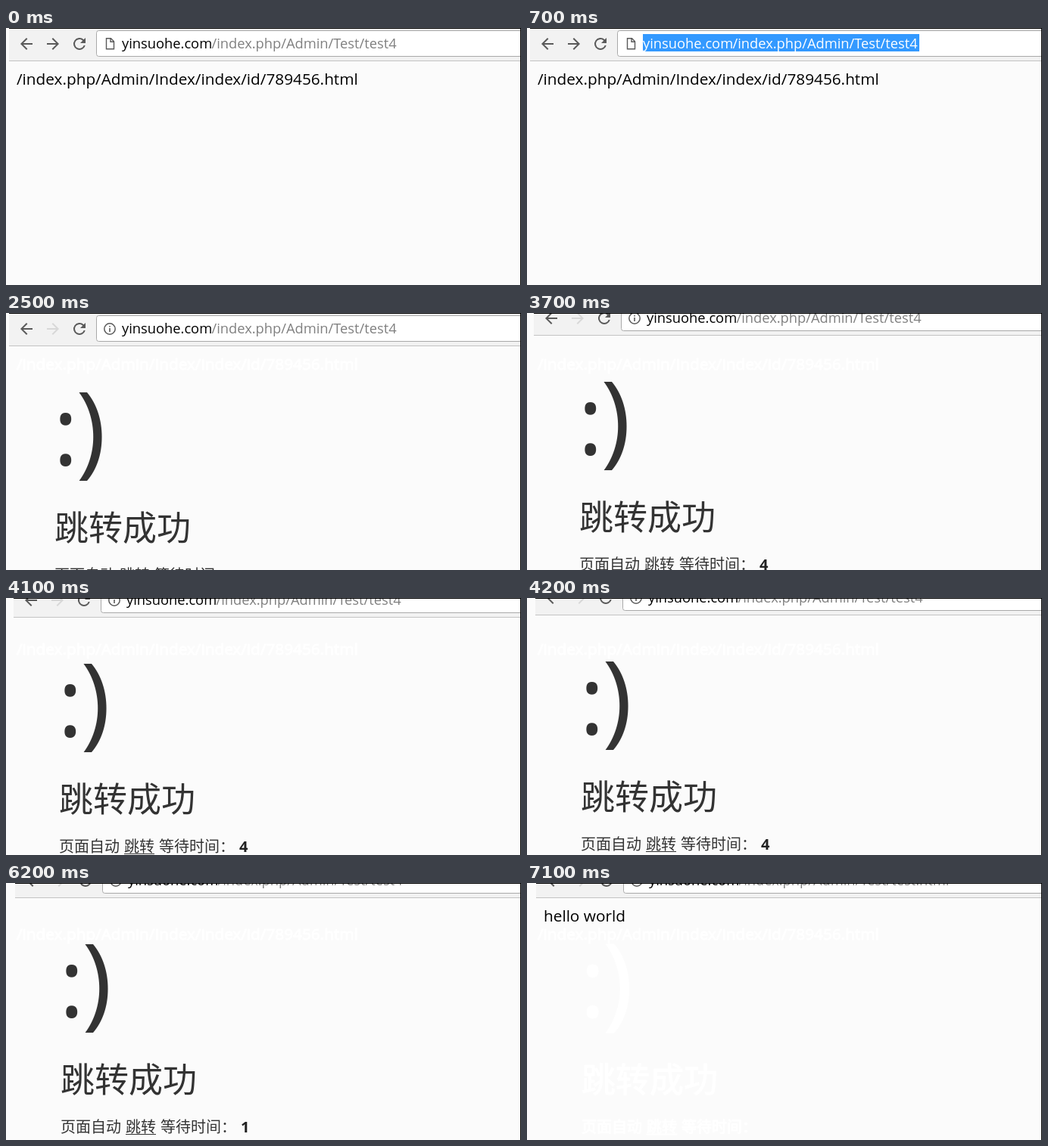
Recreate the animation shown at these times as an HTML page. Size 680 by 340 pixels, loop 8000 ms.

```html
<!DOCTYPE html>
<html lang="zh-CN">
<head>
<meta charset="utf-8">
<title>Page redirect</title>
<style>
  html, body { margin: 0; width: 100%; height: 100%; overflow: hidden; background: #fbfbfb; }
  svg { display: block; width: 100vw; height: 100vh; }
  text { font-family: "Open Sans", "Noto Sans", "Noto Sans CJK SC", "Noto Sans CJK", sans-serif; white-space: pre; }
  .url { font-size: 18.3px; }
  .body { font-size: 20.75px; }
  .colon { font-size: 126px; }
  .paren { font-size: 133px; }
  .title { font-size: 45px; }
  .wait { font-size: 20px; }
  .title, .wait { font-family: "Noto Sans CJK SC", "Noto Sans CJK", sans-serif; font-weight: 350; }
  .residue { fill: #fff; stroke: #fff; stroke-width: 1; }
  #count { font: bold 20px "Open Sans", "Noto Sans", sans-serif; }
</style>
</head>
<body>
<svg viewBox="0 0 680 340">
  <defs>
    <path id="arrow" d="M20 11H7.83l5.59-5.59L12 4l-8 8 8 8 1.41-1.41L7.83 13H20z"/>
    <g id="notice">
      <text class="colon" x="62" y="200.5">:</text>
      <text class="paren" x="92.5" y="200.5">)</text>
      <text class="title" x="64" y="300.5">跳转成功</text>
      <g class="wait">
        <text x="64" y="354">页面自动</text>
        <text x="150" y="354">跳转</text>
        <text x="196" y="354">等待时间：</text>
      </g>
      <rect x="150" y="356" width="40" height="1"/>
    </g>
  </defs>

  <rect width="680" height="340" fill="#fbfbfb"/>
  <text id="oldLine" class="body residue" x="14" y="75">/index.php/Admin/Index/index/id/789456.html</text>

  <g id="camera">
    <rect x="4" y="0" width="700" height="43" fill="#f2f2f2"/>
    <rect x="4" y="43" width="700" height="1" fill="#c3c3c3"/>
    <g fill="#5a5a5a">
      <use href="#arrow" x="15" y="9"/>
      <use id="forward" href="#arrow" transform="translate(74 9) scale(-1 1)"/>
      <path transform="translate(85 9)" d="M17.65 6.35A8 8 0 1 0 19.73 14h-2.08A6 6 0 1 1 12 6c1.66 0 3.14.69 4.22 1.78L13 11h7V4z"/>
    </g>
    <rect x="119.5" y="3.5" width="600" height="34" rx="3" fill="#fff" stroke="#a9a9a9"/>
    <path id="pageIcon" d="M132.5 13.7h6l4 4v10h-10zM138 13.7v4.5h4.5" fill="none" stroke="#5a5a5a" stroke-width="1.4"/>
    <g id="infoIcon">
      <circle cx="137" cy="21" r="7.2" fill="none" stroke="#5a5a5a" stroke-width="1.5"/>
      <path d="M136.2 20h1.6v5h-1.6zM136.2 17h1.6v1.6h-1.6z" fill="#5a5a5a"/>
    </g>
    <rect id="selection" y="8" height="23" fill="#39f"/>
    <text id="domain" class="url" x="153" y="27">yinsuohe.com</text>
    <text id="path" class="url" x="271.5" y="27"></text>
    <rect id="caret" x="517" y="8" width="1" height="22" fill="#8c7f78"/>

    <use id="noticeResidue" class="residue" href="#notice"/>
    <g id="noticeNow" fill="#333">
      <use href="#notice"/>
      <text id="count" x="302" y="353.6" fill="#222"></text>
    </g>
  </g>

  <text id="hello" class="body" x="22" y="51">hello world</text>
  <rect id="topEdge" y="0" width="680" height="1"/>
  <rect x="679" width="1" height="340"/>
</svg>
<script>
const LOOP = 8000;
const SELECT = 600, SELECT_ALL = 700, CARET_ON = 1800, CARET_OFF = 2300, NOTICE = 2500, DONE = 7100;
const TICKS = [3400, 4400, 5300, 6200];
// [time, dx, dy]
const PAN = [[0, 0, 0], [3700, 5, -14], [4100, 6, -18], [4200, 7, -21], [4300, 8, -24]];

const $ = id => document.getElementById(id);
const set = (id, name, value) => $(id).setAttribute(name, value);
const show = (id, on) => { $(id).style.display = on ? "" : "none"; };
const write = (id, text) => { if ($(id).textContent !== text) $(id).textContent = text; };

function draw(t) {
  const between = (from, to) => t >= from && t < to;
  const selecting = between(SELECT, CARET_ON);
  const allSelected = between(SELECT_ALL, CARET_ON);
  const redirected = t >= NOTICE;

  const [, dx, dy] = PAN.findLast(step => t >= step[0]);
  set("camera", "transform", `translate(${dx} ${dy})`);
  set("topEdge", "x", 4 + dx);

  const selectionStart = allSelected ? 153 : 271;
  show("selection", selecting);
  set("selection", "x", selectionStart);
  set("selection", "width", 518 - selectionStart);
  set("domain", "fill", allSelected ? "#fff" : "#000");
  set("path", "fill", selecting ? "#fff" : "#808080");
  write("path", "/index.php/Admin/Test/test" + (t >= DONE ? ".html" : "4"));
  show("caret", between(CARET_ON, CARET_OFF));

  set("forward", "fill", redirected ? "#d8d8d8" : "#5a5a5a");
  show("pageIcon", !redirected);
  show("infoIcon", redirected);
  $("oldLine").classList.toggle("residue", redirected);

  show("noticeNow", between(NOTICE, DONE));
  show("noticeResidue", t >= DONE);
  write("count", String(5 - TICKS.filter(tick => t >= tick).length));
  show("hello", t >= DONE);
}

let start;
function frame(now) {
  start ??= now;
  draw((now - start) % LOOP);
  requestAnimationFrame(frame);
}
draw(0);
requestAnimationFrame(frame);
</script>
</body>
</html>
```
